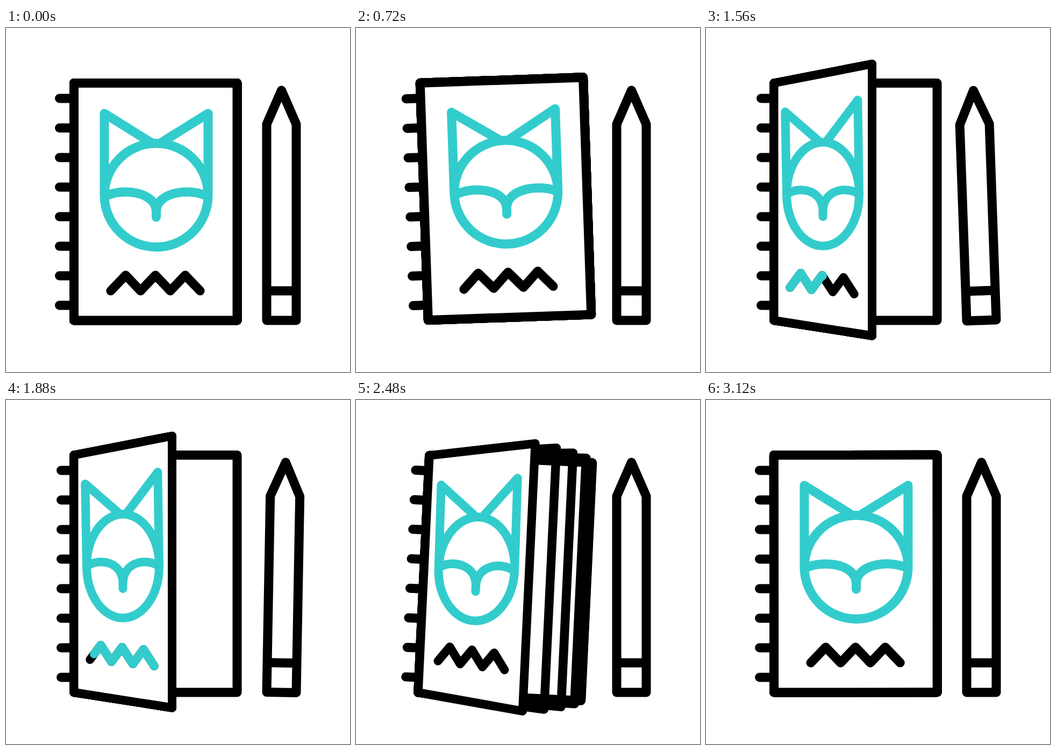
Write an HTML page that moves like this. It is 640 by 640 pixels and loops after 3200 ms.

```html
<!DOCTYPE html>
<html lang="en">
<head>
<meta charset="utf-8">
<title>Sketchbook and pencil</title>
<style>
  html, body { margin: 0; width: 100%; height: 100%; overflow: hidden; background: #fff; }
  svg { display: block; width: 100vw; height: 100vh; }
  path { fill: none; stroke: #000; stroke-width: 17; stroke-linecap: round; stroke-linejoin: round; }
  .filled { fill: #fff; }
  .teal { stroke: #3cc; }
</style>
</head>
<body>
<svg viewBox="0 0 640 640">
  <g id="book">
    <path id="tabs"/>
    <g id="sheets"></g>
    <path id="fox" class="teal"/>
    <path id="scribble"/>
    <path id="ink" class="teal" pathLength="1"/>
  </g>
  <g id="pencil">
    <path class="filled" d="M485 179L512.5 116L540 179V544H485ZM485 489H540"/>
  </g>
</svg>
<script>
const LOOP = 3200, STEP = 40, PAGES = 4;
const $ = id => document.getElementById(id);
const clamp = x => Math.min(1, Math.max(0, x));
const mix = (a, b, k) => a + (b - a) * k;
const ease = (t, start, length) => (1 - Math.cos(Math.PI * clamp((t - start) / length))) / 2;

// Rocks from rest through each peak angle and back, one beat per move
function rock(t, start, beat, ...peaks) {
  let angle = 0;
  [...peaks, 0].forEach((peak, i) => {
    angle = mix(angle, peak, ease(t, start + i * beat, beat));
  });
  return angle;
}

// Turn of sheet i: 0 lies flat, 1 is open; the front cover is sheet 0
function turn(t, i) {
  const open = i ? ease(t, 754 + 56 * i, 420) : ease(t, 740, 420);
  const close = i ? ease(t, 2316 - 94 * i, 560) : ease(t, 2360, 560);
  return open * (1 - close);
}

function sheetPath(q, lift) {
  const x = mix(430, 309, q);
  return `M126.5 102.5L${x} ${102.5 - 35.5 * lift}V${544 + 28.5 * lift}L126.5 544Z`;
}

function foxPath(q) {
  const cx = mix(279.5, 217.5, q), cy = 311 - 2 * q;
  const rx = mix(96.5, 67.5, q), ry = 96.5;
  let d = `M${cx - rx} ${cy}a${rx} ${ry} 0 1 1 ${2 * rx} 0a${rx} ${ry} 0 1 1 ${-2 * rx} 0`;
  for (const side of [-1, 1]) {
    const x = k => cx + side * rx * k;
    const tip = 159 - q * (14 + 11 * side);
    d += `M${x(1)} ${cy}L${x(1 - 0.04 * q * side)} ${tip}L${x(0.1)} ${213 - 2 * q}`;
    d += `M${x(1)} ${314 - 4 * q}C${x(0.7)} ${297 - 4 * q} ${cx} ${303 - 4 * q} ${cx} 342V${352 - q}`;
  }
  return d;
}

function zigzag(q) {
  const points = [];
  for (let i = -3; i <= 3; i++) {
    points.push(mix(278 + 27.7 * i, 216 + 19.9 * i, q), (i % 2 ? 489 : 460) + 2 * q * i);
  }
  return "M" + points.join(" ");
}

// Back cover, pages from the deepest up, front cover
const sheets = Array.from({ length: PAGES + 2 }, (_, i) => {
  const el = document.createElementNS("http://www.w3.org/2000/svg", "path");
  if (i < 2 || i > PAGES) el.setAttribute("class", "filled");
  return $("sheets").appendChild(el);
});
sheets[0].setAttribute("d", sheetPath(0, 0));

function draw(t) {
  // Page height trails page width on the way up and on the way down
  const curve = t < 1700 ? 1.45 : mix(1.2, 0.6, clamp((t - 2200) / 280));
  for (let i = 0; i <= PAGES; i++) {
    const q = turn(t, i), sheet = sheets[PAGES + 1 - i];
    sheet.setAttribute("d", sheetPath(q, i ? q ** curve : q));
    sheet.style.strokeWidth = 17 - q;
  }

  const cover = turn(t, 0);
  let tabs = "";
  for (let i = 0; i < 8; i++) tabs += `M${99.5 + 3 * cover} ${131 + 55 * i}H127`;
  $("tabs").setAttribute("d", tabs);

  $("fox").setAttribute("d", foxPath(cover));
  for (const id of ["scribble", "ink"]) $(id).setAttribute("d", zigzag(cover));
  for (const id of ["fox", "scribble", "ink"]) $(id).style.strokeWidth = 17 - cover;

  const from = ease(t, 1800, 500), to = ease(t, 1320, 480);
  const ink = $("ink").style;
  ink.display = to - from > 0.001 ? "" : "none";
  ink.strokeDasharray = `${to - from} 2`;
  ink.strokeDashoffset = -from;

  const sway = rock(t % 2240, 0, 300, 3, -3);
  const swing = rock(t, 970, 340, 3, -3, 2.3);
  $("book").setAttribute("transform", `rotate(${sway} 116 315)`);
  $("pencil").setAttribute("transform", `rotate(${swing} 512.5 544)`);
}

function tick() {
  const t = performance.now() % LOOP;
  draw(Math.floor(t / STEP) * STEP);
  requestAnimationFrame(tick);
}
tick();
</script>
</body>
</html>
```
